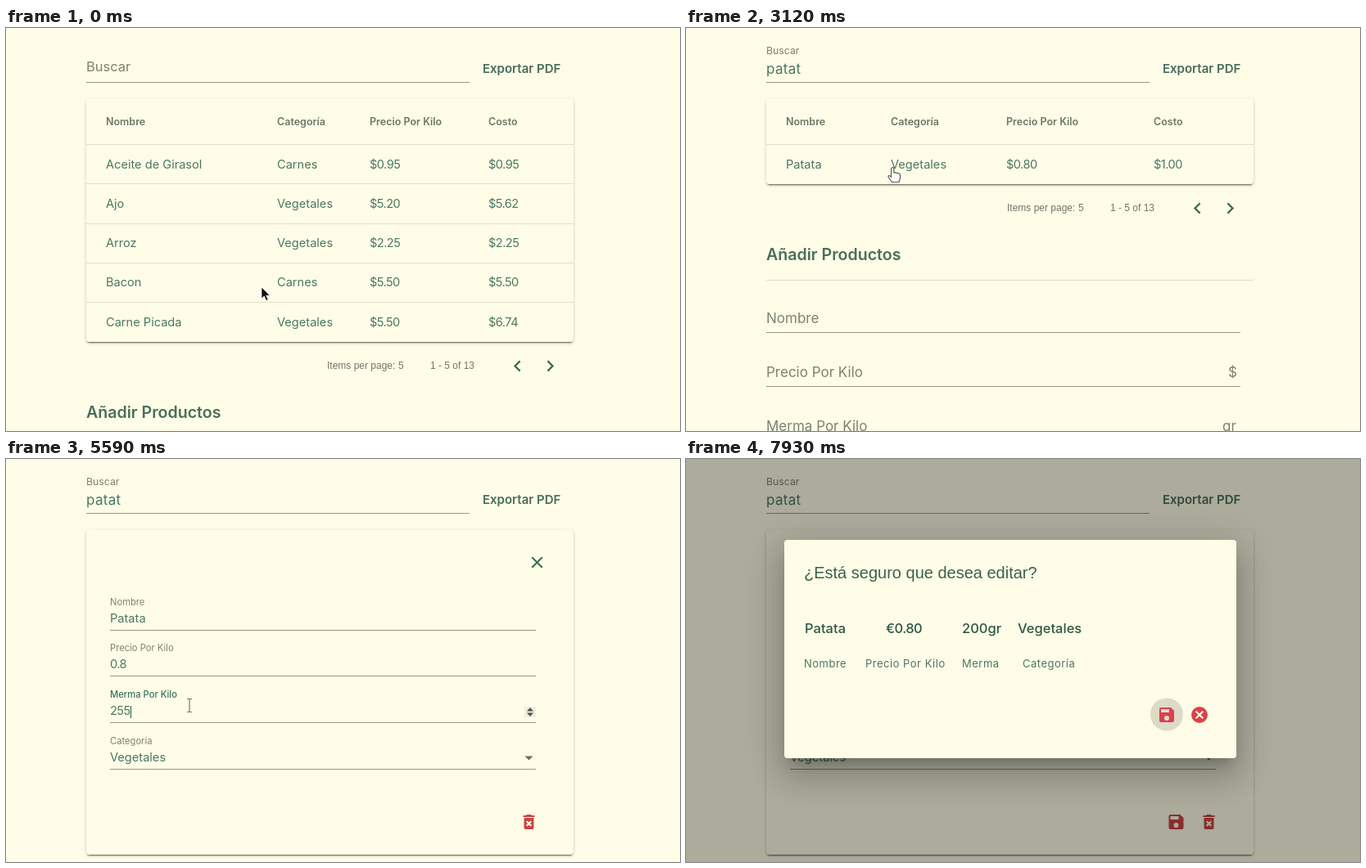
An HTML page that plays this animation: 823 by 493 pixels, repeating every 8 s.

```html
<!DOCTYPE html>
<html lang="es">
<head>
<meta charset="utf-8">
<title>Productos</title>
<style>
  html, body { margin: 0; width: 100%; height: 100%; overflow: hidden; background: #fffde7; }
  svg { display: block; }
  text { font-family: Inter, "Open Sans", sans-serif; fill: #4a7861; white-space: pre; }
  .cell { font-size: 14.6px; }
  .num { letter-spacing: -.55px; }
  .head { font-size: 12.5px; font-weight: 600; fill: #6b7868; }
  .label { font-size: 11.2px; fill: #7d8473; }
  .focus { fill: #39745a; font-weight: 500; }
  .hint { font-size: 17px; fill: #7d8172; }
  .query { font-size: 17px; letter-spacing: .3px; }
  .button { font-size: 15px; font-weight: 600; fill: #476d59; }
  .title { font-size: 19.6px; font-weight: 600; fill: #487059; }
  .page { font: 12px "Liberation Sans", Arial, sans-serif; fill: #74756a; }
  .ask { font: 20px "Liberation Sans", Arial, sans-serif; fill: #3a624d; }
  .value { font-size: 16.5px; font-weight: 500; fill: #2f5844; }
  .caption { font-size: 13px; letter-spacing: .5px; fill: #4d7560; }
  .card, .modal { position: absolute; background: #fffde7; border-radius: 4px; }
  .card { box-shadow: 0 3px 1px -2px rgba(0,0,0,.4), 0 2px 2px rgba(0,0,0,.18), 0 1px 5px rgba(0,0,0,.12); }
  .modal { box-shadow: 0 11px 15px -7px rgba(0,0,0,.2), 0 24px 38px 3px rgba(0,0,0,.14), 0 9px 46px 8px rgba(0,0,0,.12); }
</style>
</head>
<body>
<svg id="stage" width="823" height="493" viewBox="0 0 823 493"></svg>
<script>
const GREEN = '#3a6b52', RED = '#cb4443', RULE = '#96988a';
const ICONS = {
  left: 'M15.4 7.4L14 6l-6 6 6 6 1.4-1.4-4.6-4.6z',
  right: 'M8.6 7.4L10 6l6 6-6 6-1.4-1.4 4.6-4.6z',
  close: 'M19 6.4L17.6 5 12 10.6 6.4 5 5 6.4l5.6 5.6L5 17.6 6.4 19l5.6-5.6 5.6 5.6 1.4-1.4-5.6-5.6z',
  save: 'M17 3H5a2 2 0 0 0-2 2v14a2 2 0 0 0 2 2h14a2 2 0 0 0 2-2V7zm-5 16a3 3 0 1 1 0-6 3 3 0 0 1 0 6zm3-10H5V5h10z',
  trash: 'M6 19a2 2 0 0 0 2 2h8a2 2 0 0 0 2-2V7H6zm2.5-7.1l1.4-1.4 2.1 2.1 2.1-2.1 1.4 1.4-2.1 2.1 2.1 2.1-1.4 1.4-2.1-2.1-2.1 2.1-1.4-1.4 2.1-2.1zM15.5 4l-1-1h-5l-1 1H5v2h14V4z',
  cancel: 'M12 2a10 10 0 1 0 0 20 10 10 0 0 0 0-20zm5 13.6L15.6 17 12 13.4 8.4 17 7 15.6l3.6-3.6L7 8.4 8.4 7l3.6 3.6L15.6 7 17 8.4 13.4 12z'
};

const text = (x, y, cls, content, id = '') =>
  `<text x="${x}" y="${y}" class="${cls}" ${id && `id="${id}"`}>${content}</text>`;
const rule = (x1, x2, y, color = RULE) =>
  `<path d="M${x1} ${y}H${x2}" stroke="${color}"/>`;
const icon = (name, x, y, color = RED, scale = 1) =>
  `<path d="${ICONS[name]}" fill="${color}" fill-rule="evenodd" transform="translate(${x} ${y}) scale(${scale}) translate(-12 -12)"/>`;
const panel = (cls, x, y, w, h) =>
  `<foreignObject width="823" height="493"><div class="${cls}" style="left:${x}px;top:${y}px;width:${w}px;height:${h}px"></div></foreignObject>`;

function table(id, columns, rows) {
  const cells = (values, y, cls) => values.map((v, i) =>
    text(columns[i], y, cls + (v[0] === '$' ? ' num' : ''), v)).join('');
  const step = 48.25;
  return `<g id="${id}">${panel('card', 98, 87, 595, 56 + step * rows.length)}
    ${cells(['Nombre', 'Categoría', 'Precio Por Kilo', 'Costo'], 119, 'head')}
    ${rows.map((row, i) => rule(98, 693, Math.round(142 + i * step) + .5, '#e2e0cd') +
      cells(row, 171.5 + i * step, 'cell')).join('')}</g>`;
}

const field = (y, label, value, id = '') =>
  text(127, y - 30, 'label', label, id && id + 'Label') +
  text(127, y - 9, 'cell' + (/\d/.test(value) ? ' num' : ''), value, id) + rule(127, 647, y + .5);

const emptyField = (y, label, unit = '') =>
  text(98, y - 11, 'hint', label) + text(unit === '$' ? 662 : 655, y - 11, 'hint', unit) +
  rule(98, 677, y + .5);

const stage = document.getElementById('stage');
stage.innerHTML = `
  <rect width="823" height="493" fill="#fffde7"/>
  ${text(98, 53, 'hint', 'Buscar', 'searchLabel')}
  ${text(98, 56, 'query', '', 'query')}
  ${rule(98, 566, 66.5)}
  <path id="searchLine" stroke="${GREEN}" stroke-width="2"/>
  ${text(582, 55, 'button', 'Exportar PDF')}
  ${table('fullTable', [122, 331, 444, 589], [
    ['Aceite de Girasol', 'Carnes', '$0.95', '$0.95'],
    ['Ajo', 'Vegetales', '$5.20', '$5.62'],
    ['Arroz', 'Vegetales', '$2.25', '$2.25'],
    ['Bacon', 'Carnes', '$5.50', '$5.50'],
    ['Carne Picada', 'Vegetales', '$5.50', '$6.74']])}
  ${table('shortTable', [122, 250, 391, 571], [['Patata', 'Vegetales', '$0.80', '$1.00']])}
  <g id="footer">
    ${text(392, 417, 'page', 'Items per page:')}${text(479, 417, 'page', '5')}
    ${text(518, 417, 'page', '1 - 5 of 13')}
    ${icon('left', 624.5, 413.5, GREEN, 1.15)}${icon('right', 664.5, 413.5, GREEN, 1.15)}
    ${text(98, 476.5, 'title', 'Añadir Productos')}
    ${rule(98, 693, 501.5, '#deddca')}
    ${emptyField(565, 'Nombre')}${emptyField(631, 'Precio Por Kilo', '$')}
    ${emptyField(697, 'Merma Por Kilo', 'gr')}
  </g>
  <g id="form">
    ${panel('card', 98, 87, 595, 397)}
    ${icon('close', 648.5, 126.5, GREEN)}
    ${field(209, 'Nombre', 'Patata')}${field(265, 'Precio Por Kilo', '0.8')}
    ${field(322, 'Merma Por Kilo', '255', 'waste')}${field(379, 'Categoría', 'Vegetales')}
    <path id="wasteLine" stroke="${GREEN}" stroke-width="2"/>
    <path d="M633.5 363.5h10l-5 5z" fill="#6b7060"/>
    <g id="spinner"><rect x="633" y="303" width="14" height="13" fill="#efeee0"/>
      <path d="M636 308.5l4-4.5 4 4.5zm0 2l4 4.5 4-4.5z" fill="#4c5148"/></g>
    <g id="save">${icon('save', 598.5, 444)}</g>${icon('trash', 638.5, 444)}
  </g>
  <path id="caret" stroke="#2f5844"/>
  <rect id="shade" width="823" height="493"/>
  <g id="dialog">
    ${panel('modal', 120, 99, 551.5, 266.5)}
    ${text(144, 146, 'ask', '¿Está seguro que desea editar?')}
    ${text(145, 212.5, 'value', 'Patata')}${text(244, 212.5, 'value num', '€0.80')}
    ${text(337, 212.5, 'value', '200gr')}${text(405, 212.5, 'value', 'Vegetales')}
    ${text(144, 255, 'caption', 'Nombre')}${text(219, 255, 'caption', 'Precio Por Kilo')}
    ${text(337, 255, 'caption', 'Merma')}${text(411, 255, 'caption', 'Categoría')}
    <circle id="halo" cx="587" cy="312.5" r="20" fill="#dddbc8"/>
    ${icon('save', 587, 313, '#d9434a')}${icon('cancel', 627, 313, '#d9434a')}
  </g>
  <g id="pointer">
    <path id="arrow" d="M0 0v14l3.3-3 2.3 5.4 2.5-1-2.4-5.2h4.5z" fill="#111" stroke="#fff" stroke-width=".7"/>
    <path id="beam" d="M-3-8h2.2l.8.8.8-.8H3M0-7.2V7.2M-3 8h2.2l.8-.8.8.8H3" fill="none" stroke="#777a6e" stroke-width="1.2"/>
    <path id="hand" d="M-3.6-8.5q1.6-1 2.4.6V-2.5q1.5-.8 2.5.4 1.6-.7 2.5.6 2-.5 2.7 1.2V4L5 9h-8.5L-8 2.5q-.2-2 1.8-1.3l1.8 1.6V-7.5z" fill="#fffef4" stroke="#5b5f55" stroke-width="1.2" stroke-linejoin="round"/>
  </g>`;

const el = id => document.getElementById(id);
const show = (id, on) => { el(id).style.display = on ? '' : 'none'; };
const set = (id, attrs) => { for (const k in attrs) el(id).setAttribute(k, attrs[k]); };
const clamp = v => Math.max(0, Math.min(1, v));
const progress = (t, a, b) => clamp((t - a) / (b - a));
const ease = p => p * p * (3 - 2 * p);
const mix = (a, b, p) => a + (b - a) * p;
const reached = (t, times) => times.filter(time => t >= time).length;

const TRAIL = [
  [0, 312, 317], [780, 280, 58], [2340, 280, 58], [2990, 255, 179.5], [3380, 255, 179.5],
  [4160, 319, 374.5], [4550, 300, 350], [4810, 300, 350], [5460, 224, 301.5], [8000, 224, 301.5]
];

function pointerAt(t) {
  const i = Math.max(1, TRAIL.findIndex(stop => stop[0] > t));
  const [t0, x0, y0] = TRAIL[i - 1], [t1, x1, y1] = TRAIL[i];
  const p = ease(progress(t, t0, t1));
  return [mix(x0, x1, p), mix(y0, y1, p)];
}

function pointerKind(t, y) {
  if (y < 70 || t >= 5200) return 'beam';
  return t < 2340 || y < 143 ? 'arrow' : 'hand';
}

function underline(id, x1, x2, y, p) {
  const mid = (x1 + x2) / 2, half = (x2 - x1) / 2 * p;
  show(id, p > 0);
  set(id, { d: `M${mid - half} ${y}H${mid + half}` });
}

function render(time) {
  // The screen refreshes in steps of 130 ms.
  const t = Math.floor(time / 130) * 130;
  const searching = t >= 780 && t < 3120;
  const editing = t >= 5590 && t < 7150;
  const formOpen = t >= 3380;
  const filtered = t >= 2340;

  const float = ease(progress(t, 715, 975));
  set('searchLabel', { y: mix(53, 32, float), class: searching ? 'hint focus' : 'hint' });
  el('searchLabel').style.fontSize = mix(16.5, 12.3, float) + 'px';
  el('searchLabel').style.fontWeight = 400;
  el('query').textContent = 'patat'.slice(0, reached(t, [1170, 1300, 1430, 1560, 1820]));
  underline('searchLine', 98, 566, 67, searching ? progress(t, 650, 910) : 0);

  show('fullTable', !filtered);
  show('shortTable', filtered && !formOpen);
  show('footer', !formOpen);
  set('footer', { transform: `translate(0 ${filtered ? -193 : 0})` });
  show('form', formOpen);

  const erased = reached(t, [5850, 5980]), typed = reached(t, [6240, 6500]);
  el('waste').textContent = '255'.slice(0, 3 - erased) + '00'.slice(0, typed);
  set('wasteLabel', { class: editing ? 'label focus' : 'label' });
  underline('wasteLine', 127, 647, 322.5, editing ? progress(t, 5590, 5850) : 0);
  show('spinner', editing);
  show('save', t >= 5850);

  const [owner, left, top, bottom] = editing ? ['waste', 127, 302, 317] : ['query', 98, 42, 60];
  const x = Math.round(left + el(owner).getComputedTextLength()) + .5;
  show('caret', editing || searching);
  set('caret', { d: `M${x} ${top}V${bottom}` });

  const grow = progress(t, 7400, 7665);
  set('shade', { opacity: .325 * Math.sin(Math.PI / 2 * progress(t, 7442, 7930)) });
  show('dialog', t >= 7540);
  set('dialog', {
    opacity: grow,
    transform: `translate(396 232.5) scale(${mix(.7, 1, grow)}) translate(-396 -232.5)`
  });
  show('halo', t >= 7800);

  const [px, py] = pointerAt(t), kind = pointerKind(t, py);
  show('pointer', t < 7670);
  set('pointer', { transform: `translate(${px} ${py})` });
  for (const name of ['arrow', 'beam', 'hand']) show(name, name === kind);
}

const start = performance.now();
function tick() {
  render((performance.now() - start) % 8000);
  requestAnimationFrame(tick);
}
tick();
</script>
</body>
</html>
```
